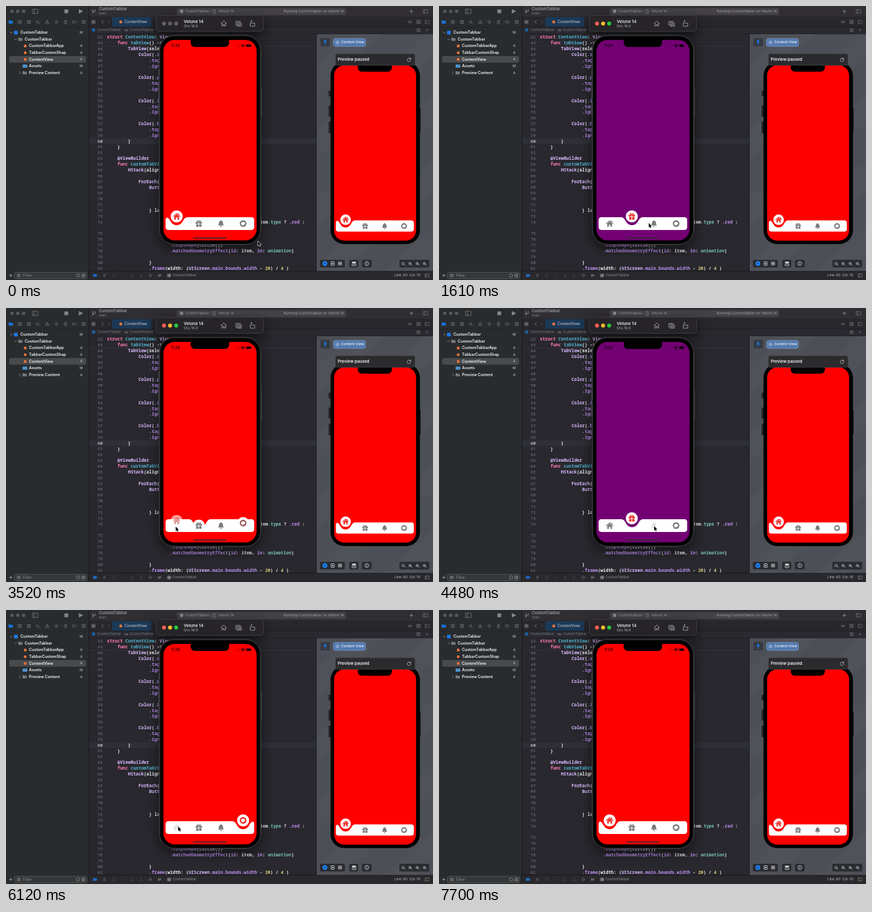
An HTML page with a canvas that plays this animation: 800x515 px, repeating every 7730 ms.

```html
<!DOCTYPE html>
<html lang="en">
<head>
<meta charset="utf-8">
<title>Custom tab bar</title>
<style>
html, body { margin: 0; width: 100%; height: 100%; overflow: hidden; background: #292a30; }
canvas { display: block; width: 800px; height: 515px; }
</style>
</head>
<body>
<canvas id="stage" width="800" height="515"></canvas>
<script>
const W = 800, H = 515, LOOP = 7730;
const UI = 'Inter, "Liberation Sans", sans-serif';
const MONO = '"Noto Sans Mono", "DejaVu Sans Mono", monospace';
const view = document.getElementById('stage').getContext('2d');
const backdrop = document.createElement('canvas');
backdrop.width = W;
backdrop.height = H;
let c = backdrop.getContext('2d');

function box(x, y, w, h, color, r = 0, edge) {
  c.beginPath();
  c.roundRect(x, y, w, h, r);
  if (color) { c.fillStyle = color; c.fill(); }
  if (edge) { c.strokeStyle = edge; c.lineWidth = 1; c.stroke(); }
}
function disc(x, y, r, color) {
  c.beginPath();
  c.arc(x, y, r, 0, 7);
  c.fillStyle = color;
  c.fill();
}
function path(d, x, y, color, { fill = false, width = 1, scale = 1 } = {}) {
  c.save();
  c.translate(x, y);
  c.scale(scale, scale);
  const p = new Path2D(d);
  c.lineWidth = width;
  c.lineCap = c.lineJoin = 'round';
  c.fillStyle = c.strokeStyle = color;
  fill ? c.fill(p) : c.stroke(p);
  c.restore();
}
function text(s, x, y, size, color, weight = 400, align = 'left', font = UI) {
  c.font = `${weight} ${size}px ${font}`;
  c.textAlign = align;
  c.textBaseline = 'middle';
  c.fillStyle = color;
  c.fillText(s, x, y);
}

const GLYPH = {
  panel: 'M-5-4H5V4H-5ZM-2-4V4',
  cross: 'M-3-3H3V3H-3ZM-1.5-1.5L1.5 1.5M1.5-1.5L-1.5 1.5',
  tree: 'M-3-3H-1V-1H-3ZM1-3H3V-1H1ZM-3 2H-1V3H-3ZM1 2H3V3H1ZM-2-1V2M2-1V2',
  search: 'M1 0A2.3 2.3 0 1 1-3.6 0A2.3 2.3 0 1 1 1 0M.5 1.5L3 3.5',
  warn: 'M0-3.3L3.5 3H-3.5ZM0-1V1',
  diamond: 'M0-3.5L3.5 0L0 3.5L-3.5 0ZM-1 0L0 1L1.5-1',
  spray: 'M-2-1H2V3.5H-2ZM-1-1V-3H1V-1M2.5-3.5L3.5-4',
  tag: 'M-4-2H2L4 0L2 2H-4Z',
  lines: 'M-3-3H3V3H-3ZM-1.5-1H1.5M-1.5 1H1.5',
  grid: 'M-3-3H-.5V-.5H-3ZM.5-3H3V-.5H.5ZM-3 .5H-.5V3H-3ZM.5 .5H3V3H.5Z',
  left: 'M1.5-3L-1.5 0L1.5 3',
  right: 'M-1-2.5L1.5 0L-1 2.5',
  down: 'M-2-1L0 1.2L2-1',
  plus: 'M-3.3 0H3.3M0-3.3V3.3',
  swap: 'M-4-1H3L1-3M4 1H-3L-1 3',
  pause: 'M-1.3-3V3M1.3-3V3',
  circle: 'M3.4 0A3.4 3.4 0 1 1-3.4 0A3.4 3.4 0 1 1 3.4 0',
  up: 'M0 3V-3M-2-1L0-3L2-1M-3 3H3',
  folder: 'M-4-3H-1L0-2H4V3H-4Z',
  branch: 'M-2-3V3M2-3V-1Q2 1-2 1',
  house: 'M-5 0L0-5L5 0M-3.5-1V4.5H-1V1.5H1V4.5H3.5V-1',
  camera: 'M-5-4H3V3H-5ZM-3 5H5V-1M1-.5A2 2 0 1 1-3-.5A2 2 0 1 1 1-.5',
  rotate: 'M-4-1H4V5H-4ZM-4-3Q-3-5-1-5M-2.5-6L-1-5L-2.5-3.6',
  reload: 'M2.7-1.8A3.3 3.3 0 1 0 3.3 .5M3.3-3.5V-1.3H1'
};
const icon = (name, x, y, color = '#8c8c91', scale = 1, width = .9) =>
  path(GLYPH[name], x, y, color, { scale, width });

function drawSidebar() {
  box(0, 0, 155, H, '#292c2e');
  [11, 22, 33].forEach(x => disc(x, 10, 3.3, '#55575a'));
  icon('panel', 55, 10, '#7b7d80');
  box(109.5, 6.5, 7, 7, '#85878a');
  path('M-3.5-4.2L4.5 0L-3.5 4.2Z', 140, 10, '#85878a', { fill: true });
  path(GLYPH.folder, 9, 30, '#1673d8', { fill: true });
  ['cross', 'tree', 'search', 'warn', 'diamond', 'spray', 'tag', 'lines']
    .forEach((name, i) => icon(name, 26 + i * 17.1, 30, '#808285', .92, .8));
  box(0, 39.5, 155, .7, '#202224');
  box(6, 94, 144, 12.5, '#484a4c', 3);
  const rows = [['CustomTabbar', 27, 'M'], ['CustomTabbar', 35, ''], ['CustomTabbarApp', 43, 'A'],
    ['TabbarCustomShap', 43, 'A'], ['ContentView', 43, 'A'], ['Assets', 43, 'M'], ['Preview Content', 43, 'A']];
  rows.forEach(([name, x, mark], i) => {
    const y = 50 + i * 12.6;
    text(name, x, y, 7.25, '#f4f4f5', 600);
    text(mark, 141, y, 6.5, '#b4b5b7', 500, 'center');
    if (i < 2) icon('down', x - 17, y, '#a0a2a5', .9);
    if (i === 0) box(x - 12, y - 3.5, 7, 7, '#1c79e5', 1.5);
    else if (i === 1 || i === 6) path(GLYPH.folder, x - 8, y, '#77797c', { fill: true });
    else if (i === 5) box(x - 12, y - 3, 9, 6, '#4b91c9', 1);
    else disc(x - 7, y, 2.6, '#e9743c');
    if (i === 6) icon('right', x - 17, y, '#a0a2a5', .9);
  });
  icon('plus', 9, 506.5, '#ccc', .8);
  box(15.5, 500.5, 136, 12, '#35383a', 3, '#55585a');
  icon('lines', 24, 506.5, '#999', .8);
  text('Filter', 32, 506.8, 7.1, '#8b8d90');
  icon('circle', 135, 506.5, '#999', .9);
  icon('lines', 145, 506.5, '#999', .9);
  box(155, 0, 1, H, '#151618');
}

function drawToolbar() {
  box(156, 0, 644, 20, '#302e33');
  icon('branch', 165, 10, '#a5a5a8', 1.1);
  text('CustomTabbar', 174, 6.2, 7.5, '#9b9a9e', 600);
  text('main', 174, 14.2, 6.3, '#85838a');
  box(320, 4, 317, 13, '#444247', 3);
  box(326, 7, 6, 6, '#89888c', 1);
  text('CustomTabbar', 336, 10.3, 6.4, '#9c9b9f');
  icon('right', 382, 10.5, '#8d8b90', .7);
  box(388, 7, 4, 7, null, 1, '#858488');
  text('Velune 14', 398, 10.3, 6.4, '#9c9b9f');
  text('Running CustomTabbar on Velune 14', 633, 10.3, 6.5, '#a5a4a8', 400, 'right');
  icon('plus', 759.5, 10, '#999');
  icon('panel', 786, 10, '#858488', .8);
  box(156, 20, 644, 20, '#28272c');
  icon('grid', 164, 30, '#85848a', 1, .8);
  icon('left', 181, 30);
  icon('right', 193, 30, '#5b5a60');
  box(199, 21, 73, 18, '#1c3957');
  disc(215, 30, 2.7, '#e9743c');
  text('ContentView', 222, 30, 7, '#d3dae2');
  icon('swap', 757, 30, '#77767d', .9);
  icon('lines', 773, 30, '#77767d');
  icon('panel', 789, 30, '#77767d', .75);
  box(156, 39.5, 644, .7, '#17171a');
  box(156, 40, 644, 13, '#29292f');
  box(161, 42, 6, 6, '#1c5c97', 1);
  text('CustomTabbar', 171, 45.3, 6.5, '#7b7a82');
  icon('right', 221, 45.5, '#66656c', .7);
  path(GLYPH.folder, 226, 45.5, '#5b5a62', { fill: true, scale: .7 });
  text('CustomTabbar', 232, 45.3, 6.5, '#7b7a82');
  icon('lines', 773, 45.5, '#77767d', .9);
  icon('plus', 789, 45.5, '#77767d', .7);
  box(156, 52.4, 644, .7, '#19191c');
}

const CODE = {
  22: 'struct ContentView: View {', 43: '    func tabView() -> some View {',
  44: '        TabView(selection: $tab) {', 60: '        }', 61: '    }', 63: '    @ViewBuilder',
  64: '    func customTabView() {', 65: '        HStack(alignment: .top) {', 67: '            ForEach(items) {',
  68: '                Button {', 72: '                } label: {',
  77: '                        .clipShape(Circle())',
  78: '                        .matchedGeometryEffect(id: item, in: animation)',
  80: '                }', 81: '                .frame(width: (UIScreen.main.bounds.width - 20) / 4 )'
};
['red', 'purple', 'indigo', 'blue'].forEach((name, i) => {
  const n = 45 + i * 4;
  CODE[n] = `            Color(.${name})`;
  CODE[n + 1] = '                .tag(tab)';
  CODE[n + 2] = '                .ignores()';
});
const CHAR = 4.94;

function tint(token) {
  if (/^(struct|func|some)$/.test(token)) return '#ff7ab2';
  if (/^(ContentView|tabView|customTabView)$/.test(token)) return '#4eb0cc';
  if (/^(animation|\.type)$/.test(token)) return '#78c2b3';
  if (/^\d/.test(token)) return '#d9c97c';
  if (/^(\.\w+|id|in)$/.test(token)) return '#bd90f2';
  if (/^[@A-Z]/.test(token)) return '#dabaff';
  return '#ececf0';
}
function codeLine(s, x, y) {
  for (const m of s.matchAll(/[.@]?\w+|[^\s\w]/g)) {
    const strong = /^(struct|func|some)$/.test(m[0]);
    text(m[0], x + m.index * CHAR, y, 8.23, tint(m[0]), strong ? 800 : 600, 'left', MONO);
  }
}
function drawEditor() {
  box(156, 53, 426, 445, '#29282e');
  box(156, 248.5, 426, 10.8, '#2f3037');
  for (let n = 42; n <= 81; n++) {
    const line = n === 42 ? 22 : n;
    const y = 69.8 + 10.86 * (n - 43 + (n > 74 ? 1 : 0));
    text(line, 181, y, 7.7, n === 60 ? '#fff' : '#7d7c86', 400, 'right', MONO);
    if (CODE[line]) codeLine(CODE[line], 189, y);
  }
  codeLine('tem.type ? .red :', 476, 406.4);
  box(156, 75.4, 426, .7, '#424148');
}

function drawFooter() {
  box(156, 498, 644, 17, '#29292d');
  box(156, 497.6, 644, .8, '#17171a');
  path('M-4-2.5H2L4.5 0L2 2.5H-4Z', 167, 506.5, '#1f6ac0', { fill: true });
  ['pause', 'reload', 'down', 'up', 'up', 'diamond', 'branch', 'swap', 'grid'].forEach((name, i) =>
    icon(name, 184.5 + i * 17.2 - (i > 6 ? 17 : 0), 506.5, i > 0 && i < 5 ? '#4b4b50' : '#7d7d82', .85));
  box(303, 503.5, 6, 6, '#77777c', 1);
  text('CustomTabbar', 312, 506.4, 6.5, '#8f8f94');
  text('Line: 60  Col: 10', 776, 506.4, 6.4, '#c2c2c6', 400, 'right');
  icon('panel', 789, 506.5, '#999', .7);
}

function drawPreview() {
  c.save();
  c.beginPath();
  c.rect(582, 53, 218, 445);
  c.clip();
  box(582, 53, 218, 445, '#4c4f56');
  for (let i = 0; i < 5; i++)
    path('M0 0L260-230V-175L0 55Z', 570, 120 + i * 125, 'rgba(255,255,255,.02)', { fill: true });
  c.restore();
  box(581, 53, 1, 445, '#17171a');
  box(589, 60, 18, 16, '#363a42', 3);
  path('M-2-4H2L1-1L3 1H-3L-1-1ZM-.4 1V5H.4V1Z', 598, 68, '#167fff', { fill: true });
  box(613.5, 61, 60, 15, '#5479ae', 4, '#7594c0');
  icon('circle', 621, 68.5, '#d8e4f5', .85, .8);
  disc(621, 68.5, 1, '#d8e4f5');
  text('Content View', 628, 68.3, 6.65, '#f0f5fc', 500);

  box(604.5, 159, 4, 11, '#202124', 1);
  box(604.5, 187, 4, 21, '#202124', 1);
  box(604.5, 217, 4, 22, '#202124', 1);
  box(774, 192, 3, 46, '#202124', 1);
  box(608, 105, 167.5, 342.5, '#000', 26);
  box(614.7, 111.5, 153.6, 329.5, '#f00', 19);
  notch(659, 111, 64, 12.5);
  drawTabs(618, 403, .88, [1, 0, 0, 0], 0, [1, 1, 1, 1]);

  box(617.5, 90, 148.5, 21.5, '#2b2a2d', 3, '#3c3c40');
  text('Preview paused', 621.5, 100.6, 7.7, '#f2f2f3', 600);
  icon('reload', 755, 101, '#c9c9cc');

  [[588, 47], [643, 17], [667, 18], [737, 56]].forEach(([x, w]) => box(x, 477, w, 14.5, '#2a2c31', 3));
  disc(597.5, 484, 4.5, '#1683ff');
  path('M-1.2-2L2 0L-1.2 2Z', 597.5, 484, '#16335a', { fill: true });
  box(609, 480.5, 6, 7, null, 1, '#d7d7da');
  path('M-1.2-2L1.8 .3L-1.2 2Z', 612, 484, '#d7d7da', { fill: true });
  icon('grid', 626, 484, '#bbb');
  box(648, 480.5, 8, 3, '#ddd', 1.5);
  box(648, 485, 8, 3, null, 1.5, '#ddd');
  icon('circle', 676, 484, '#ccc', 1.1);
  box(675.6, 481.5, 1, 5, '#ccc');
  [745, 758, 771.5, 785].forEach((x, i) => {
    icon('search', x, 484, '#ccc', .95);
    if (i) box(x - 2.2, 483.5, 2, 1, '#ccc');
  });
}

function notch(x, y, w, h) {
  box(x, y - 1, w, h + 1, '#000', [0, 0, 8, 8]);
}

function shadow(alpha, blur, drop) {
  c.shadowColor = `rgba(0,0,0,${alpha})`;
  c.shadowBlur = blur;
  c.shadowOffsetY = drop;
}

function drawSimulator() {
  shadow(.55, 22, 7);
  box(281, 17, 202, 31, '#272528', 6);
  box(286.5, 54.5, 191.5, 394.5, '#000', 29);
  shadow(0, 0, 0);
  box(281.5, 17.5, 201, 30, null, 5.5, '#434145');
  text('Velune 14', 333, 29.5, 7.9, '#e2e2e4', 600);
  text('Oru 16.0', 333, 38, 6.8, '#b0afb3');
  icon('house', 408, 33, '#b5b4b8');
  icon('camera', 436, 33, '#b5b4b8');
  icon('rotate', 462, 33, '#b5b4b8');
  box(477, 155, 3, 53, '#303033', 1);
  [[119, 12], [151, 23], [182, 23]].forEach(([y, h]) => box(284.6, y, 3, h, '#303033', 1));
  box(287, 55, 190.5, 393.5, null, 28.5, '#56565a');
  box(288.5, 56.5, 187.5, 390.5, null, 27, '#242427');
}

const mix = (a, b, p) => a + (b - a) * p;
const clamp = (v, lo = 0, hi = 1) => Math.min(hi, Math.max(lo, v));

function tabIcon(i, color) {
  const fill = { fill: true };
  if (i === 0) {
    path('M-6.3 0L0-5.6L6.3 0', 0, 0, color, { width: 1.4 });
    path('M-4.5 0L0-4L4.5 0V6H1.5V2H-1.5V6H-4.5ZM3-5.5H4.6V-1.5L3-3Z', 0, 0, color, fill);
  } else if (i === 1) {
    path('M-6-3H-.6V.2H-6ZM.6-3H6V.2H.6ZM-5 1.2H-.6V6H-5ZM.6 1.2H5V6H.6Z', 0, 0, color, fill);
    path('M0-3Q-4-3-3.3-5Q-1.5-7 0-3Q1.5-7 3.3-5Q4-3 0-3', 0, 0, color, { width: 1.2 });
  } else if (i === 2) {
    path('M0-6.3Q1-6.3 1-5.2Q3.8-4.3 3.8-1Q3.8 2 5.7 3.6H-5.7Q-3.8 2-3.8-1Q-3.8-4.3-1-5.2Q-1-6.3 0-6.3ZM-1.8 4.5H1.8Q1.3 6.4 0 6.4Q-1.3 6.4-1.8 4.5Z', 0, 0, color, fill);
  } else {
    disc(0, 0, 6.3, color);
    path('M3.8-.3A3.8 3.1 0 1 0-2.4 2.2Q-2.4 3.4-3.2 4Q-1.4 3.9-.5 2.8A3.8 3.1 0 0 0 3.8-.3Z', 0, 0, '#fff', fill);
  }
}

// lift: 0 resting, 1 raised; spot: position of the dip in tab units
function drawTabs(x, y, scale, lift, spot, alpha) {
  const w = 166, h = 24, step = w / 4, mid = step * (spot + .5), depth = 15, r = 5;
  c.save();
  c.translate(x, y);
  c.scale(scale, scale);
  c.save();
  c.beginPath();
  c.roundRect(0, 0, w, h, r);
  c.clip();
  c.beginPath();
  c.moveTo(-20, 0);
  c.lineTo(mid - 20, 0);
  c.bezierCurveTo(mid - 11.5, 0, mid - 12.5, depth, mid, depth);
  c.bezierCurveTo(mid + 12.5, depth, mid + 11.5, 0, mid + 20, 0);
  c.lineTo(w + 20, 0);
  c.lineTo(w + 20, h);
  c.lineTo(-20, h);
  c.fillStyle = '#fff';
  c.fill();
  c.restore();
  lift.forEach((v, i) => {
    const k = clamp(v);
    const color = `rgb(${mix(122, 240, k)},${mix(122, 48, k)},${mix(124, 44, k)})`;
    c.save();
    c.translate(step * (i + .5), mix(12, -1.5, v));
    c.globalAlpha = alpha[i];
    disc(0, 0, 11.2, '#fff');
    tabIcon(i, color);
    c.restore();
  });
  c.restore();
}

const COLORS = ['#f00', '#730073', '#5856d6', '#00f'];
const TAPS = [[1050, 1], [1790, 2], [2390, 3], [3370, 0], [4000, 1], [4570, 2], [5170, 3], [6150, 0]];
const PRESS = 110, SWITCH = 50;
const POINTER = [[0, 472, 442], [450, 472, 442], [900, 363, 410], [1280, 363, 410], [1610, 393, 408],
  [1690, 403, 410], [2050, 404, 411], [2290, 447, 414], [2550, 447, 414], [3250, 318, 411], [3540, 318, 411],
  [3880, 361, 410], [4120, 361, 410], [4440, 403, 410], [4700, 403, 410], [5040, 443, 408], [5350, 443, 408],
  [5980, 322.5, 407], [6400, 322.5, 407], [7400, 560, -20], [LOOP, 560, -20]];

function spring(ms) {
  if (ms <= 0) return 0;
  const s = ms / 1000, omega = 12.57, zeta = .78, damp = Math.sqrt(1 - zeta * zeta);
  const a = omega * damp * s;
  return 1 - Math.exp(-zeta * omega * s) * (Math.cos(a) + zeta / damp * Math.sin(a));
}

function stateAt(t) {
  let from = 0, to = 0, p = 1, color = 0;
  const alpha = [1, 1, 1, 1];
  for (const [start, tab] of TAPS) {
    if (t >= start) { from = to; to = tab; p = spring(t - start); }
    if (t >= start - SWITCH) color = tab;
    if (t >= start - PRESS && t < start + 300)
      alpha[tab] = mix(.2, 1, clamp((t - start) / 300));
  }
  const lift = [0, 0, 0, 0];
  lift[from] = 1 - p;
  lift[to] = from === to ? 1 : p;
  return { color, alpha, lift, spot: mix(from, to, p) };
}

function drawScreen(t) {
  const s = stateAt(t);
  box(295, 63.7, 174.5, 376.8, COLORS[s.color], 21);
  notch(346, 63, 72, 14);
  const ink = 'rgba(8,0,8,.88)';
  text('5:24', 310, 74.8, 7.2, ink, 600);
  [432, 434.5, 437].forEach(x => disc(x, 75.5, .6, ink));
  path('M-3.6-1.2Q0-4 3.6-1.2M-2 .4Q0-1.2 2 .4M-.4 1.8H.4', 444, 75.2, ink, { width: 1.3 });
  box(450, 72.3, 9, 4.8, ink, 1.3);
  box(459.5, 73.8, .9, 1.8, ink);
  drawTabs(299, 397, 1, s.lift, s.spot, s.alpha);
  box(351, 435, 62, 2.2, 'rgba(50,45,48,.85)', 1.1);
}

function drawPointer(t) {
  const i = Math.max(1, POINTER.findIndex(k => k[0] > t));
  const [t0, x0, y0] = POINTER[i - 1], [t1, x1, y1] = POINTER[i];
  const u = clamp((t - t0) / (t1 - t0)), e = u * u * (3 - 2 * u);
  const x = mix(x0, x1, e), y = mix(y0, y1, e);
  const arrow = 'M0 0V8.2L1.9 6.5L3.2 9.4L4.6 8.8L3.3 6H5.8Z';
  path(arrow, x, y, '#e8e8e8', { width: 1.4 });
  path(arrow, x, y, '#050505', { fill: true });
}

drawSidebar();
drawToolbar();
drawEditor();
drawFooter();
drawPreview();
drawSimulator();
c = view;

function frame(now) {
  const t = now % LOOP;
  c.drawImage(backdrop, 0, 0);
  const lights = t < TAPS[0][0] - PRESS ? ['#625f64', '#625f64', '#625f64'] : ['#fe5f57', '#febc2e', '#28c840'];
  lights.forEach((color, i) => disc(296 + i * 11.4, 33, 3.7, color));
  drawScreen(t);
  drawPointer(t);
  requestAnimationFrame(frame);
}
frame(performance.now());
</script>
</body>
</html>
```
